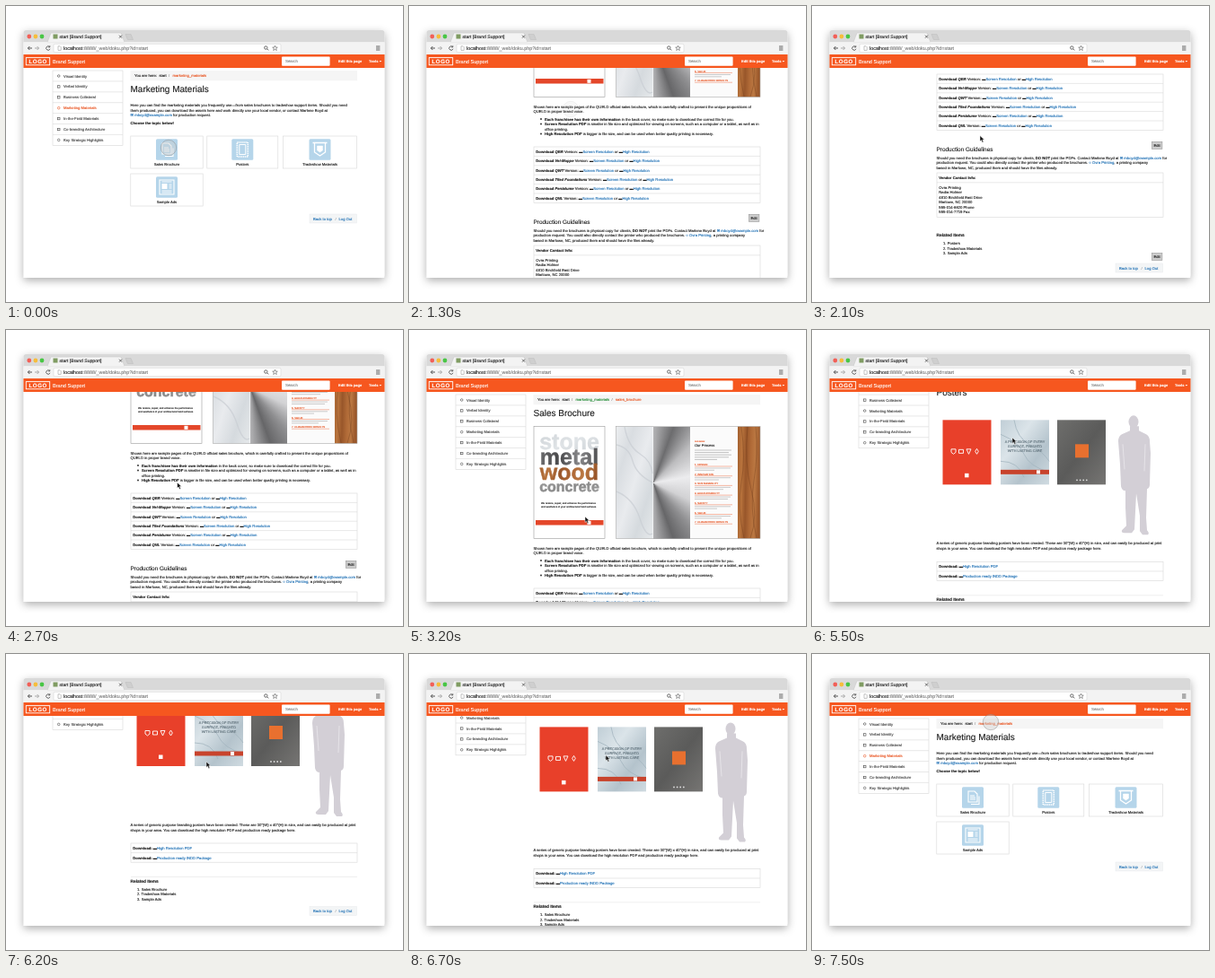
Animation, 442 px wide and 330 px high, one loop 7600 ms. Source, as an HTML page:

```html
<!DOCTYPE html>
<html lang="en">
<head>
<meta charset="utf-8">
<title>Brand Support</title>
<style>
html, body { margin: 0; width: 100%; height: 100%; overflow: hidden; background: #fff; }
svg { display: block; width: 442px; height: 330px; }
text { font-family: "Liberation Sans", Arial, sans-serif; color: #1c1c1c; text-rendering: geometricPrecision; white-space: pre; }
text, tspan { fill: currentColor; stroke: currentColor; stroke-width: .12px; }
.b { font-weight: bold; }
.i { font-style: italic; }
.l { color: #1d6fb4; }
#win { filter: drop-shadow(0 3px 5px rgba(0,0,0,.32)); }
.steel { height: 125px; background: conic-gradient(from 0deg at 0 50%, #b4b4b6, #6c6c6e 20deg, #bcbcbe 45deg, #ececee 80deg, #d2d2d4 115deg, #8f8f91 140deg, #666668 160deg, #b4b4b6 180deg); }
</style>
</head>
<body>
<svg id="stage" viewBox="0 0 442 330"></svg>
<script>
const RED = '#e8501c', LINE = '#d8d8d8';

// Inline markup: *bold*, ~italic~, {link}
const fmt = s => s
  .replace(/\*(.+?)\*/g, '<tspan class="b">$1</tspan>')
  .replace(/~(.+?)~/g, '<tspan class="i">$1</tspan>')
  .replace(/\{(.+?)\}/g, '<tspan class="l">$1</tspan>');
const text = (x, mid, s, size = 4.2, attr = '') =>
  `<text x="${x}" y="${mid + size * .36}" font-size="${size}" ${attr}>${fmt(s)}</text>`;
const tint = c => `style="color:${c}"`;
const rect = (x, y, w, h, fill = 'none', attr = '') =>
  `<rect x="${x}" y="${y}" width="${w}" height="${h}" fill="${fill}" ${attr}/>`;
const box = (x, y, w, h, fill = '#fff', line = LINE) => rect(x, y, w, h, fill, `stroke="${line}" stroke-width=".6"`);
const path = (d, stroke, width = .6, fill = 'none', attr = '') =>
  `<path d="${d}" stroke="${stroke}" stroke-width="${width}" fill="${fill}" ${attr}/>`;
const dot = (x, y, r, fill, attr = '') => `<circle cx="${x}" cy="${y}" r="${r}" fill="${fill}" ${attr}/>`;
const lines = (x, y, step, list, size) => list.map((s, i) => text(x, y + i * step, s, size)).join('');
const gradient = (id, dir, colours) => `<linearGradient id="${id}" ${dir}>` +
  colours.map((c, i) => `<stop offset="${i / (colours.length - 1)}" stop-color="${c}"/>`).join('') + '</linearGradient>';

const defs = '<defs>' +
  gradient('marble', 'x2="1" y2="1"', ['#eceef0', '#d9dde1', '#e9ebee', '#d5dade', '#e6e9eb']) +
  gradient('wood', 'x2="1" y2=".1"', ['#a3602f', '#b9743d', '#98562a', '#b06a37', '#bb7842', '#995629']) +
  gradient('letters', 'x2="1" y2="0"', ['#6a6a6c', '#48484a', '#88888a', '#4f4f51']) +
  gradient('pale', 'x2="1" y2="1"', ['#cdd2d6', '#dfe3e6', '#cbd0d4']) +
  gradient('cement', 'x2="1" y2="1"', ['#9c9c9c', '#888', '#a2a2a2']) +
  gradient('ice', 'x2="1" y2="1"', ['#c0ced6', '#dbe4e9', '#b4c3cc', '#d0dbe1']) +
  gradient('slate', 'x2="1" y2="1"', ['#6e6e6c', '#5b5b5a', '#767573']) +
  '<clipPath id="view"><rect x="19.5" y="69" width="402" height="234"/></clipPath></defs>';

function chrome() {
  const lights = ['#f25f57', '#f6bd3b', '#48c645'].map((c, i) => dot(25.8 + i * 7.1, 34, 2.4, c)).join('');
  return '<path d="M19.5 40.5V30q0-3 3-3h396q3 0 3 3v10.5z" fill="#d9d9d9"/>' + lights +
    path('M46 40.5l4-10.5h78l4 10.5z', '#c4c4c4', .5, '#f3f3f3') +
    path('M133 31.5h6l2.5 6h-6z', '#bbb', .5, '#cfcfcf') +
    rect(52.5, 31.5, 5, 5, '#7f9b62') + text(59.5, 34.3, 'start [Brand Support]', 5.1) +
    path('M126 32.7l3 3m0-3l-3 3', '#444', .8) +
    rect(19.5, 40.3, 402, 14, '#f3f3f3') +
    path('M29 47h-4.6m2-2l-2 2 2 2', '#555', 1) + path('M32 47h4.6m-2-2l2 2-2 2', '#aaa', 1) +
    path('M48.6 45.6a2.2 2.2 0 1 0 .4 2.2m-.2-3.6v1.7h-1.7', '#555', .9) +
    rect(53, 42.3, 253, 9.4, '#fff', 'rx="1.5" stroke="#ccc" stroke-width=".5"') +
    path('M58 44.8h2.2l1 1v3.6H58z', '#888', .5) +
    text(64, 47.2, 'localhost', 5.4) +
    text(85.6, 47.2, ':8888/_web/doku.php?id=start', 5.4, 'opacity=".6" style="filter:blur(.5px)"') +
    dot(289.3, 46.5, 1.7, 'none', 'stroke="#444" stroke-width=".8"') + path('M290.6 47.8l1.6 1.6', '#444', .9) +
    path('M299.5 44.2l.8 1.9 2 .1-1.6 1.3.6 2-1.8-1.1-1.8 1.1.6-2-1.6-1.3 2-.1z', '#555', .6) +
    path('M412 45h4.4M412 47h4.4M412 49h4.4', '#555', .9) +
    rect(19.5, 54, 402, 15, '#f6571f') +
    rect(22.3, 57.6, 26.4, 8.2, 'none', 'stroke="#fff" stroke-width=".9"') +
    text(35.7, 61.8, '*LOGO*', 6.2, tint('#fff') + ' text-anchor="middle" letter-spacing=".5"') +
    text(52, 61.8, 'Brand Support', 5.6, tint('#fff')) +
    rect(307, 56.6, 53.6, 10.2, '#fff', 'rx="1"') + text(311, 61.8, 'Search', 4.4, tint('#888')) +
    text(370, 61.8, '*Edit this page*', 4, tint('#fff')) + text(404, 61.8, '*Tools*', 4, tint('#fff')) +
    path('M415.6 61h2.6l-1.3 1.6z', 'none', 0, '#fff');
}

const menu = ['Visual Identity', 'Verbal Identity', 'Business Collateral', 'Marketing Materials',
  'In-the-Field Materials', 'Co-branding Architecture', 'Key Strategic Highlights'];
function sidebar(active) {
  return box(52, 72, 78, 83.4) + menu.map((s, i) => {
    const y = 78 + i * 11.9, c = i === active ? RED : '#444';
    const icon = i % 3 ? box(57.4, y - 1.2, 2.6, 2.4, 'none', c) : dot(58.7, y, 1.3, 'none', `stroke="${c}" stroke-width=".6"`);
    return (i ? path(`M52 ${y - 6}h78`, LINE) : '') + icon + text(64, y, s, 4.2, tint(c));
  }).join('');
}
function crumbs(leaf) {
  const slash = x => text(x, 77.4, '/', 4.2, 'opacity=".5"');
  const here = (x, s, c) => text(x, 77.4, s, 4.2, tint(c));
  return rect(138.5, 72, 252.5, 11.3, '#f5f5f5') + text(143, 77.4, 'You are here:') + text(170.5, 77.4, 'start') + slash(181) +
    here(185.5, 'marketing_materials', leaf ? '#1c8a30' : RED) + (leaf ? slash(225.5) + here(230, leaf, RED) : '');
}
const footer = y => rect(338, y, 52.5, 10, '#f3f5f6', 'stroke="#e3e6e8" stroke-width=".4"') +
  text(342, y + 5, '{Back to top}') + text(366.6, y + 5, '/', 4.2, 'opacity=".4"') + text(370.5, y + 5, '{Log Out}');
const edit = y => box(378.3, y, 11.6, 8, '#ccc', '#999') + text(384, y + 4, 'Edit', 4.2, 'text-anchor="middle"');
const related = (y, list) => text(138.5, y, '*Related Items*', 4.8) + lines(146, y + 9, 5.6, list.map((s, i) => `${i + 1}. ${s}`));
const page = (id, active, leaf, title, body) => `<g id="${id}">` + rect(19.5, 69, 402, 520, '#fff') +
  sidebar(active) + crumbs(leaf) + text(138.5, 92.6, title, 10) + body + '</g>';

function home() {
  const card = (x, y, w, label, art) => box(x, y, w, 36) +
    rect(x + w / 2 - 12, y + 3.3, 24, 23.5, '#b5d5ea', 'rx="1.5"') +
    `<g transform="translate(${x + w / 2} ${y + 15})">${art}</g>` +
    text(x + w / 2, y + 31, label, 4.2, 'text-anchor="middle"');
  const W = '#fff';
  return page('home', 3, '', 'Marketing Materials',
    lines(138.5, 110.5, 5.6, [
      'Here you can find the marketing materials you frequently use—from sales brochures to tradeshow support items. Should you need',
      'them produced, you can download the assets here and work directly use your local vendor, or contact Marlene Boyd at',
      '{✉ mboyd@example.com} for production request.']) +
    text(138.5, 130, '*Choose the topic below!*') +
    card(138.8, 145, 80.4, 'Sales Brochure', path('M-5-7h7l3 3v9h-10zM-2 7.5h9v-9M-3-2h5M-3 0h6M-3 2h6', W, 1.1)) +
    card(223.8, 145, 79, 'Posters', path('M-6-8h12v16h-12z', W, 1.6, 'none', 'stroke-dasharray="1.3 .7"') + path('M-3.5-5.5h7v11h-7z', W, 1)) +
    card(308.3, 145, 82.4, 'Tradeshow Materials', path('M-8-7.5h16M-6-7v10l6 4 6-4v-10', W, 1.3) + path('M-3-4h6v5l-3 2-3-2z', W, .5, W)) +
    card(138.8, 187, 80.4, 'Sample Ads', path('M-8-8h16v16h-16z', W, 1.1) + rect(-5.5, -4, 6, 6, W) + path('M-5.5-6h11M2.5-3h3M2.5-1h3M2.5 1h3M-5.5 4h11M-5.5 6h11', W, .9)) +
    footer(232));
}

function brochure() {
  const word = (y, s, size, id) => text(178.5, y, s, size,
    `class="b" style="fill:url(#${id});stroke:url(#${id});stroke-width:.5px" text-anchor="middle"`);
  const cover = box(139, 107.5, 79, 125, '#fff', '#999') +
    word(124.4, 'stone', 25, 'pale') + word(141.3, 'metal', 25, 'letters') +
    word(157.7, 'wood', 25, 'wood') + word(174.4, 'concrete', 16, 'cement') +
    text(147, 193, 'We restore, repair, and enhance the performance', 2.8) +
    text(147, 197.2, 'and aesthetics of your architectural hard surfaces.', 2.8) +
    rect(141, 212, 75.5, 5.5, '#e4472a') + rect(198.5, 212.8, 4, 4, '#fff');
  const steps = ['DESIGN', 'INNOVATION', 'SUSTAINABILITY', 'ACCOUNTABILITY', 'SAFETY', 'VALUE', 'GUARANTEED RESULTS'];
  const spread = rect(230.5, 107.5, 41, 125, 'url(#marble)') +
    path('M231 128q14 3 18 18t22 24M240 108q4 22 17 30t14 22M231 180q19 8 26 30t14 17', '#c9ced3', 1.4, 'none', 'opacity=".7"') +
    '<foreignObject x="271.5" y="107.5" width="41.5" height="125"><div class="steel"></div></foreignObject>' +
    rect(313, 107.5, 53, 125, '#fbfbfb') +
    text(318, 124, 'OUR WORK', 2, tint(RED)) + text(318, 129, 'Our Process', 4) +
    [0, 1, 2, 3, 4].map(i => path(`M318 ${134 + i * 2.6}h${i === 4 ? 25 : 41 - i % 2 * 3}`, '#aaa', .7)).join('') +
    steps.map((s, i) => {
      const y = 150 + i * 10.7;
      return text(318, y, `${i + 1}. ${s}`, 2.9, tint(RED)) +
        path(`M318 ${y + 2}h42`, RED, .4) + (i < 6 ? path(`M318 ${y + 4}h40M318 ${y + 6.3}h${22 + i * 5 % 17}`, '#b5b5b5', .7) : '');
    }).join('') +
    rect(366, 107.5, 25, 125, 'url(#wood)') +
    path('M370 108q5 35 0 62t3 62M377 108q-4 40 4 70t-1 54M386 108q3 30-2 60t3 64', '#6b3717', .7, 'none', 'opacity=".5"') +
    rect(230.5, 107.5, 160.5, 125, 'none', 'stroke="#aaa" stroke-width=".6"');
  const kits = ['QBR', 'Vel-Moppe', 'QWT', 'Tiled Foundations', 'Pentalume', 'QNL'];
  const table = box(139, 288, 252, 62.6) + kits.map((s, i) =>
    (i ? path(`M139 ${288 + i * 10.4}h252`, LINE) : '') +
    text(141.3, 293.2 + i * 10.4, `*Download ~${s}~* Version: ▬{Screen Resolution} or ▬{High Resolution}`)).join('');
  const bullets = [257, 262.5, 273.5].map(y => dot(147, y, .9, '#222')).join('');
  return page('brochure', -1, 'sales_brochure', 'Sales Brochure', cover + spread +
    lines(138.5, 243, 5.5, [
      'Shown here are sample pages of the QUELD official sales brochure, which is carefully crafted to present the unique propositions of',
      'QUELD in proper brand voice.']) +
    bullets + lines(151, 257, 5.5, [
      '*Each franchisee has their own information* in the back cover, so make sure to download the correct file for you.',
      '*Screen Resolution PDF* is smaller in file size and optimized for viewing on screens, such as a computer or a tablet, as well as in',
      'office printing.',
      '*High Resolution PDF* is bigger in file size, and can be used when better quality printing is necessary.']) +
    table + text(138.5, 371.5, 'Production Guidelines', 6.45) + edit(363.3) +
    lines(138.5, 381.4, 5.5, [
      'Should you need the brochures in physical copy for clients, *DO NOT* print the PDFs. Contact Marlene Boyd at {✉ mboyd@example.com} for',
      'production request. You could also directly contact the printer who produced the brochures. {○ Ovra Printing}, a printing company',
      'based in Marlowe, NC, produced them and should have the files already.']) +
    box(139, 398, 252, 49.5) + path('M139 408.8h252', LINE) + text(141.3, 403.4, '*Vendor Contact Info:*') +
    lines(141.3, 414, 5.5, ['Ovra Printing', 'Nadia Holmer', '4810 Birchfield East Drive', 'Marlowe, NC 20000', '555-014-6620 Phone', '555-014-7719 Fax']) +
    related(467.5, ['Posters', 'Tradeshow Materials', 'Sample Ads']) + edit(487.5) + footer(499));
}

function posters() {
  const icons = path('M155 156.5h5v3.5l-2.5 2-2.5-2zM163.5 157h5v4h-5zM172 156.5h5l-2.5 5.5zM183.5 156l1.8 3-1.8 3-1.8-3z', '#fff', .9);
  const art = rect(145.5, 124, 54, 72, '#e8402a') + icons + rect(170, 183.5, 4.5, 4.5, '#fff') +
    rect(210, 124, 54, 72, 'url(#ice)') + path('M210 140q20 8 26 22t28 20M225 124q3 20 18 28t21 18M210 170q20 0 26 18', '#a4b5bf', .8) +
    ['A PRECISION OF EVERY', 'SURFACE, FINISHED', 'WITH LASTING CARE'].map((s, i) =>
      text(237, 148 + i * 5, s, 3.8, tint('#62737d') + ' text-anchor="middle"')).join('') +
    rect(210, 179.5, 54, 5, '#c8432c') + rect(250, 180, 4, 4, '#fff') +
    rect(273, 124, 54, 72, 'url(#slate)') + rect(293, 151, 15, 15, '#e8702f') +
    [0, 1, 2, 3].map(i => dot(295 + i * 3.6, 191, .9, '#ddd')).join('');
  const man = '<g fill="#d3cfd6"><ellipse cx="358" cy="126" rx="5.5" ry="7"/>' +
    '<path d="M354 131v5l-9 4q-4 2-4 8l2 26 1 24q1 5 5 5l0 19 1 20-5 5q-1 3 3 3h8l3-4 2-40 4 25v17l3 4h6q2-2-1-5l-1-14 1-32q3-1 3-5l1-35-1-13q0-6-4-8l-8-4v-5z"/></g>' +
    path('M346 151l2 28M371 151l-1 30', '#f2f0f3', .6);
  return page('posters', -1, 'posters', 'Posters', art + man +
    lines(138.5, 261.5, 5.6, [
      'A series of generic purpose branding posters have been created. These are 30"(W) x 40"(H) in size, and can easily be produced at print',
      'shops in your area. You can download the high resolution PDF and production ready package here.']) +
    box(139, 282, 252, 21.2) + path('M139 292.6h252', LINE) +
    text(141.3, 287.3, '*Download:* ▬{High Resolution PDF}') + text(141.3, 298, '*Download:* ▬{Production ready INDD Package}') +
    path('M139 319.5h252', '#e4e4e4') + related(324, ['Sales Brochure', 'Tradeshow Materials', 'Sample Ads']) + footer(352.5));
}

const $ = id => document.getElementById(id);
$('stage').innerHTML = defs +
  '<path id="win" d="M19.5 303V30q0-3 3-3h396q3 0 3 3v270q0 3-3 3z" fill="#fff"/>' +
  '<g clip-path="url(#view)">' + home() + brochure() + posters() + '</g>' + chrome() +
  '<g id="arrow">' + path('M0 0v6.4l1.5-1.3 1.1 2.6 1.3-.6-1.1-2.5h2z', '#fff', .5, '#111') + '</g>' +
  '<g id="ring">' + dot(0, 0, 8.7, 'rgba(205,205,205,.4)', 'stroke="rgba(130,130,130,.6)" stroke-width=".7"') + '</g>';

const LOOP = 7600;
const shown = [[0, 'home'], [300, 'brochure'], [4100, 'home'], [4900, 'posters'], [7400, 'home']];
const scrolls = {
  home: [[0, 0]],
  brochure: [[700, 0], [1300, 131], [1700, 212], [2400, 212], [3000, 0]],
  posters: [[5300, 0], [5900, 71], [6500, 71], [7000, 0]]
};
const moves = [[0, 181, 158], [300, 181, 158], [900, 180, 115], [1300, 180, 115], [1700, 187, 144.5], [2500, 187, 144.5],
  [3000, 196, 208], [3300, 196, 208], [3800, 203, 76], [4100, 203, 76], [4500, 255, 158], [4900, 255, 158],
  [5500, 223, 120], [6600, 223, 120], [7200, 199, 76]];
const clicks = [[0, 300], [3800, 4200], [4500, 4900], [7200, LOOP]];

function at(keys, t, k = 1) {
  const n = keys.findIndex(p => p[0] > t);
  if (n < 1) return keys[n ? keys.length - 1 : 0][k];
  const a = keys[n - 1], b = keys[n];
  return a[k] + (b[k] - a[k]) * (t - a[0]) / (b[0] - a[0]);
}

function draw(now) {
  const t = Math.floor(now % LOOP / 100) * 100;
  const current = shown.filter(p => p[0] <= t).pop()[1];
  for (const id in scrolls) {
    $(id).style.display = id === current ? '' : 'none';
    $(id).setAttribute('transform', `translate(0 ${-at(scrolls[id], t)})`);
  }
  const click = clicks.some(c => t >= c[0] && t < c[1]);
  const fading = t >= 300 && t < 1500;
  const spot = `translate(${at(moves, t)} ${at(moves, t, 2)})`;
  $('arrow').setAttribute('transform', spot);
  $('ring').setAttribute('transform', spot);
  $('arrow').style.display = click || fading ? 'none' : '';
  $('ring').style.opacity = click ? 1 : fading ? .25 : 0;
}
const start = performance.now();
function tick() {
  draw(performance.now() - start);
  requestAnimationFrame(tick);
}
tick();
</script>
</body>
</html>
```
